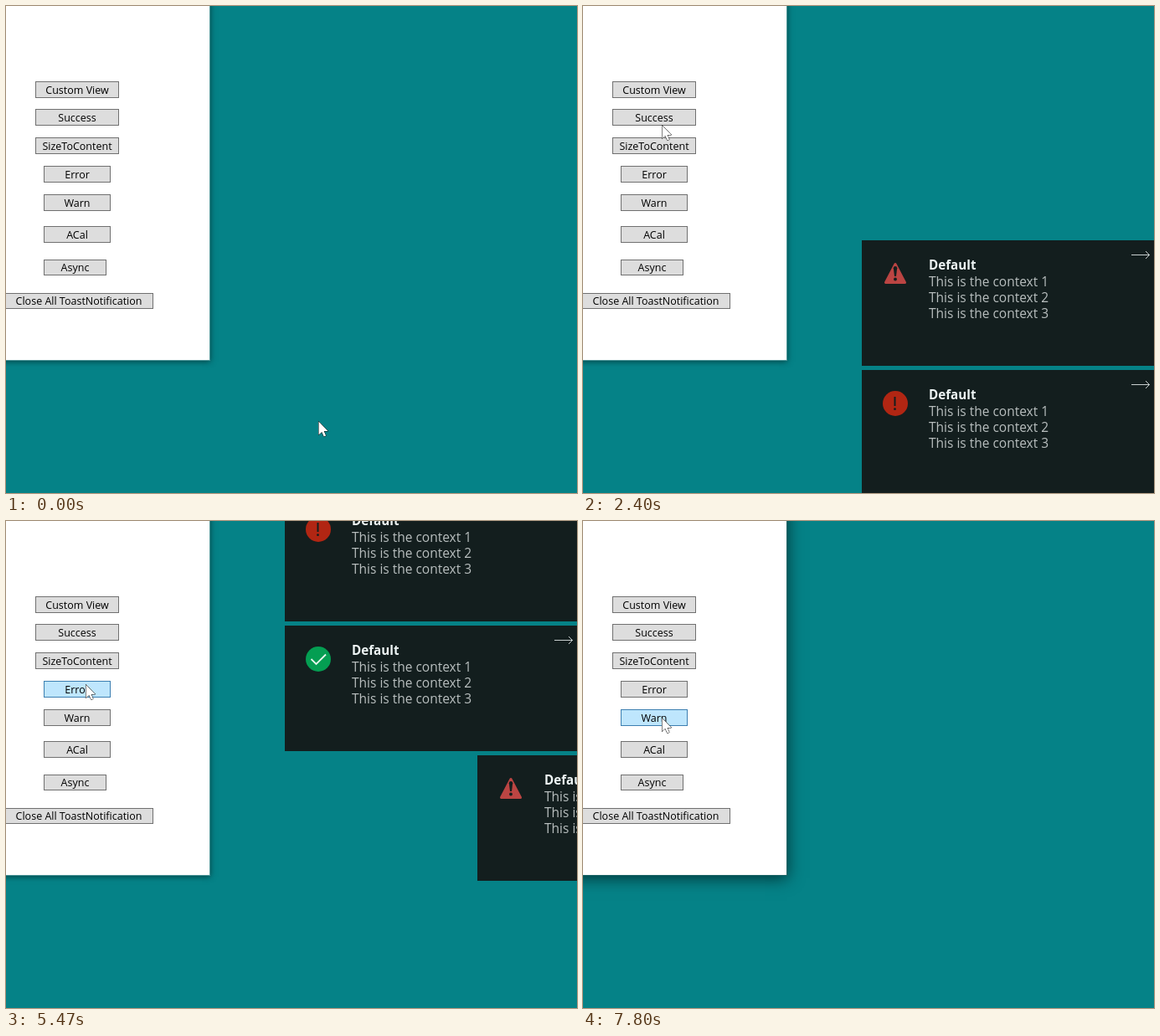
An HTML page with a canvas that plays this animation: 682x582 px, repeating every 8000 ms.

```html
<!DOCTYPE html>
<html lang="en">
<head>
<meta charset="utf-8">
<title>Toast notifications</title>
<style>
html, body { margin: 0; width: 100%; height: 100%; overflow: hidden; background: #058287; }
canvas { display: block; }
</style>
</head>
<body>
<canvas id="stage" width="682" height="582"></canvas>
<script>
const ctx = document.getElementById('stage').getContext('2d');
const W = 682, H = 582, LOOP = 8000, FPS = 15;
const FONT = '"Open Sans", "Noto Sans", sans-serif';
const TEAL = '#058287', DARK = '#131e1e';
const REST_X = 333, SLIDE = 360, SPEED = SLIDE / 500;

// label, x, y, width, height
const buttons = [
  ['Custom View', 35, 90, 100, 20],
  ['Success', 35, 123, 100, 20],
  ['SizeToContent', 35, 157, 100, 20],
  ['Error', 45, 191, 80, 20],
  ['Warn', 45, 225, 80, 20],
  ['ACal', 45, 263, 80, 20],
  ['Async', 45, 303, 75, 19],
  ['Close All ToastNotification', -2, 343, 178, 19]
];

const toasts = [
  { icon: 'error', y: 435, start: 1000, leave: 4204 },
  { icon: 'warn', y: 280, start: 2150, leave: 5147 },
  { icon: 'success', y: 125, start: 2933, leave: 5883 },
  { icon: 'error', y: -30, start: 4200, leave: 7150 }
];

// time, x, y of the pointer tip
const path = [
  [0, 373, 496], [533, 85, 206], [1333, 85, 206], [1600, 91, 236],
  [2133, 91, 236], [2400, 94, 142], [2467, 98, 132], [3467, 98, 132],
  [3533, 98, 159], [3667, 95, 195], [5667, 95, 195], [5867, 94, 235],
  [LOOP, 94, 235]
];

// spans in which the window has the focus
const focus = [[666, 800], [1733, 1866], [2600, 2733], [3866, 4000], [7800, LOOP]];

const ease = p => p * p * (3 - 2 * p);

function pointerAt(t) {
  const i = Math.max(1, path.findIndex(k => k[0] >= t));
  const [t0, x0, y0] = path[i - 1], [t1, x1, y1] = path[i];
  const p = ease((t - t0) / (t1 - t0));
  return [Math.round(x0 + (x1 - x0) * p), Math.round(y0 + (y1 - y0) * p)];
}

function toastX(toast, t) {
  if (t < toast.start - 1 || t >= toast.leave + 500) return W;
  const off = t < toast.leave
    ? Math.max(0, SLIDE / 2 - (t - toast.start) * SPEED)
    : (t - toast.leave) * SPEED;
  return Math.round(REST_X + off);
}

function line(points, color, width, close) {
  ctx.beginPath();
  points.forEach(([x, y]) => ctx.lineTo(x, y));
  if (close) ctx.closePath();
  ctx.strokeStyle = color;
  ctx.lineWidth = width;
  ctx.stroke();
}

function disc(x, y, r, color) {
  ctx.beginPath();
  ctx.arc(x, y, r, 0, Math.PI * 2);
  ctx.fillStyle = color;
  ctx.fill();
}

function text(str, x, y, font, color, align = 'left') {
  ctx.font = `${font} ${FONT}`;
  ctx.fillStyle = color;
  ctx.textAlign = align;
  ctx.fillText(str, x, y);
}

const icons = {
  error() {
    disc(40, 40, 15, '#b12613');
    line([[39.5, 32], [39.5, 43]], DARK, 2);
    disc(39.5, 46.7, 1.4, DARK);
  },
  warn() {
    ctx.lineJoin = 'round';
    ctx.fillStyle = '#bb4543';
    line([[40, 28.5], [28.5, 50.5], [51.5, 50.5]], '#bb4543', 3, true);
    ctx.fill();
    ctx.beginPath();
    [[37.8, 33], [42.2, 33], [41, 43], [39, 43]].forEach(([x, y]) => ctx.lineTo(x, y));
    ctx.fillStyle = DARK;
    ctx.fill();
    disc(40, 33.2, 2.2, DARK);
    disc(40, 46.5, 1.9, DARK);
  },
  success() {
    disc(40, 40, 15, '#049e52');
    line([[31.5, 40], [37.5, 46], [49, 34.5]], '#e4f5ec', 1.8);
  }
};

function drawWindow(active) {
  ctx.save();
  ctx.shadowColor = active ? 'rgba(0,0,0,.6)' : 'rgba(0,0,0,.5)';
  ctx.shadowBlur = active ? 18 : 7;
  ctx.shadowOffsetY = active ? 3 : 1;
  ctx.fillStyle = active ? '#1d6466' : '#4d9597';
  ctx.fillRect(-60, -60, 304, 484);
  ctx.restore();
  ctx.fillStyle = '#fff';
  ctx.fillRect(0, 0, 243, 423);
}

function drawButton([label, x, y, w, h], px, py) {
  const hover = px >= x && px < x + w && py >= y && py < y + h - 1;
  ctx.fillStyle = hover ? '#3c7fb1' : '#707070';
  ctx.fillRect(x, y, w, h);
  ctx.fillStyle = hover ? '#bee6fd' : '#ddd';
  ctx.fillRect(x + 1, y + 1, w - 2, h - 2);
  text(label, x + w / 2, y + h - 5, '12.5px', '#000', 'center');
}

function drawToast(toast, t) {
  const x = toastX(toast, t);
  if (x >= W) return;
  ctx.save();
  ctx.translate(x, toast.y);
  ctx.fillStyle = DARK;
  ctx.fillRect(0, 0, SLIDE, 150);
  icons[toast.icon]();
  text('Default', 80, 35, 'bold 15.2px', '#eef5f5');
  for (let i = 1; i <= 3; i++) {
    text('This is the context ' + i, 80, 36 + 19 * i, '15.5px', '#b9bfbf');
  }
  ctx.lineJoin = 'miter';
  line([[322, 17.5], [344, 17.5]], '#c8cfcf', 1);
  line([[339, 13], [343.5, 17.5], [339, 22]], '#c8cfcf', 1);
  ctx.restore();
}

function drawPointer(x, y) {
  ctx.save();
  ctx.translate(x + .5, y + .5);
  ctx.fillStyle = '#fff';
  ctx.lineJoin = 'miter';
  line([[0, 0], [0, 16], [3.7, 12.5], [6.2, 18], [8.6, 17], [6.2, 11.5], [11, 11.5]], '#000', 1, true);
  ctx.fill();
  ctx.restore();
}

function draw(now) {
  const t = Math.floor((now % LOOP + 4) * FPS / 1000) * 1000 / FPS % LOOP;
  const [px, py] = pointerAt(t);
  ctx.fillStyle = TEAL;
  ctx.fillRect(0, 0, W, H);
  drawWindow(focus.some(([a, b]) => t >= a && t < b - 1));
  buttons.forEach(b => drawButton(b, px, py));
  toasts.forEach(n => drawToast(n, t));
  drawPointer(px, py);
}

const begin = performance.now();
function tick() {
  draw(performance.now() - begin);
  requestAnimationFrame(tick);
}
tick();
</script>
</body>
</html>
```
